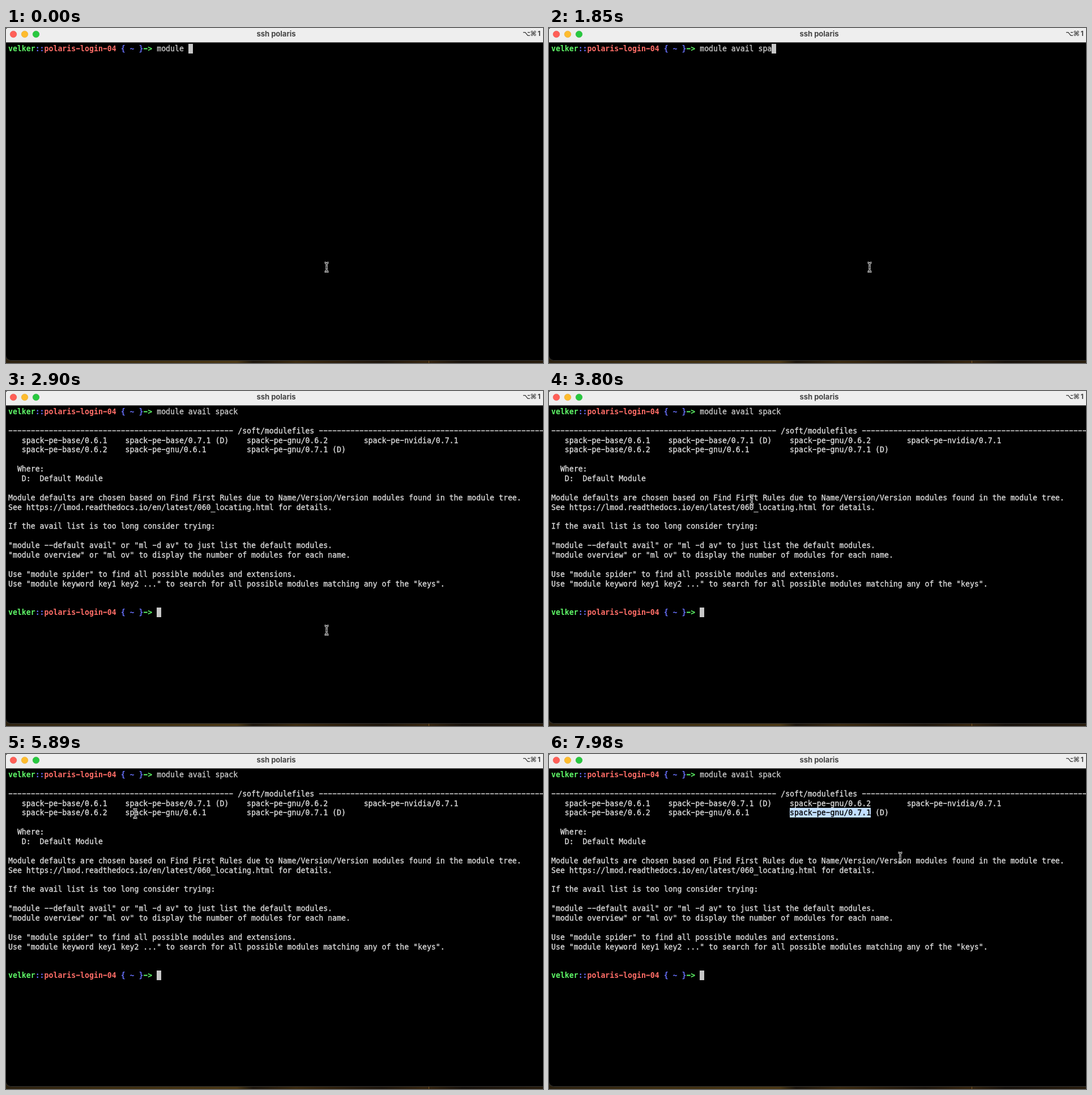
An HTML page with a canvas that plays this animation: 948x591 px, repeating every 8000 ms.

```html
<!DOCTYPE html>
<html lang="en">
<head>
<meta charset="utf-8">
<title>Terminal</title>
<style>
html, body { margin: 0; width: 100%; height: 100%; overflow: hidden; background: #000; }
canvas { display: block; }
</style>
</head>
<body>
<canvas id="stage" width="948" height="591"></canvas>
<script>
const ctx = document.getElementById('stage').getContext('2d');
const LOOP = 8000, LEFT = 4, CELL = 7.945, TOP = 28, ROW = 16.87;
const GREY = '#c7c7c7', BRIGHT = '#dadada', GREEN = '#5ffa68', RED = '#ff6d67', BLUE = '#6871ff';
const MONO = '13.2px "DejaVu Sans Mono", monospace';

const PROMPT = [['velker', GREEN], ['::', BLUE], ['polaris-login-04', RED], [' { ~ }', BLUE], ['->', GREEN]];
const PROMPT_COLS = 33;
const COMMAND = 'module avail spack';
// [time, number of command characters shown]
const TYPING = [[0, 7], [500, 8], [950, 10], [1100, 11], [1250, 12], [1400, 13],
  [1700, 14], [1850, 16], [2000, 17], [2150, 18]];
const ENTER = 2600, OUTPUT = 2900, SELECT = 7680;

const LINES = `
${'-'.repeat(50)} /soft/modulefiles ${'-'.repeat(51)}
   spack-pe-base/0.6.1    spack-pe-base/0.7.1 (D)    spack-pe-gnu/0.6.2        spack-pe-nvidia/0.7.1
   spack-pe-base/0.6.2    spack-pe-gnu/0.6.1         spack-pe-gnu/0.7.1 (D)

  Where:
   D:  Default Module

Module defaults are chosen based on Find First Rules due to Name/Version/Version modules found in the module tree.
See https://lmod.readthedocs.io/en/latest/060_locating.html for details.

If the avail list is too long consider trying:

"module --default avail" or "ml -d av" to just list the default modules.
"module overview" or "ml ov" to display the number of modules for each name.

Use "module spider" to find all possible modules and extensions.
Use "module keyword key1 key2 ..." to search for all possible modules matching any of the "keys".`.split('\n');

// Pointer moves: [start, steps, x, y], one step every 150 ms, easing out
const MOVES = [[3500, 1, 530, 448], [3650, 2, 358, 192], [4100, 7, 301, 106],
  [5150, 5, 236, 103], [5890, 3, 222, 106], [6340, 4, 312, 107],
  [7090, 2, 500, 109], [7980, 1, 620, 182]];

const cellX = col => LEFT + col * CELL;
const cellY = row => Math.round(TOP + row * ROW);

function box(col, row, cols, color) {
  ctx.fillStyle = color;
  ctx.fillRect(Math.round(cellX(col)), cellY(row), Math.round(cols * CELL), 17);
}

// Text on the terminal grid, with the wide hyphens of the terminal font;
// a hairline stroke gives regular text its smoothed weight
function print(text, col, row, color = GREY, bold = false) {
  ctx.font = (bold ? 'bold ' : '') + MONO;
  ctx.textAlign = 'left';
  ctx.fillStyle = ctx.strokeStyle = color;
  ctx.lineWidth = .35;
  ctx.lineJoin = 'round';
  const y = cellY(row) + 13;
  [...text].forEach((ch, i) => {
    const x = cellX(col + i);
    if (ch === '-') ctx.fillRect(x + .7, y - 5.5, 6.6, bold ? 2 : 1.5);
    else if (ch !== ' ') {
      ctx.fillText(ch, x, y);
      if (!bold) ctx.strokeText(ch, x, y);
    }
  });
}

function prompt(row) {
  let col = 0;
  for (const [text, color] of PROMPT) {
    print(text, col, row, color, true);
    col += text.length;
  }
}

function titleBar() {
  ctx.fillStyle = '#eee';
  ctx.beginPath();
  ctx.roundRect(0, 0, 960, 25, [3, 0, 0, 0]);
  ctx.fill();
  ctx.fillStyle = '#555';
  ctx.fillRect(0, 25, 948, 1);
  [['#ff5f57', '#e0443e'], ['#febc2e', '#dea123'], ['#28c840', '#1aab29']].forEach(([fill, edge], i) => {
    ctx.beginPath();
    ctx.arc(13 + 20 * i, 11, 5.8, 0, 7);
    ctx.fillStyle = fill;
    ctx.fill();
    ctx.strokeStyle = edge;
    ctx.lineWidth = .5;
    ctx.stroke();
  });
  ctx.fillStyle = '#454545';
  ctx.textAlign = 'center';
  ctx.font = 'bold 13px Inter, sans-serif';
  ctx.fillText('ssh polaris', 477, 15);
  ctx.font = 'bold 12px "DejaVu Sans", sans-serif';
  ctx.fillText('⌥', 919, 14);
  ctx.fillText('⌘', 931, 14);
  ctx.font = 'bold 12px Inter, sans-serif';
  ctx.fillText('1', 941, 14);
}

// Sliver of desktop below the window's rounded corner
function desktop() {
  const g = ctx.createLinearGradient(0, 0, 948, 0);
  [[0, '#2c2110'], [.2, '#3d2d10'], [.43, '#4a3714'], [.46, '#1c150c'], [.54, '#3a290f'],
    [.62, '#2c1e0c'], [.7, '#1d150c'], [.78, '#35240e'], [.85, '#17110b'], [1, '#281c0d']]
    .forEach(stop => g.addColorStop(...stop));
  ctx.fillStyle = g;
  ctx.fillRect(0, 575, 948, 16);
  ctx.fillStyle = '#7a5523';
  ctx.fillRect(746, 587, 1, 4);
  ctx.fillStyle = '#000';
  ctx.strokeStyle = '#333';
  ctx.lineWidth = 1;
  ctx.beginPath();
  ctx.roundRect(-.5, 26, 960, 560.5, [0, 0, 0, 9]);
  ctx.fill();
  ctx.stroke();
}

function pointerAt(t) {
  let x = 566, y = 422;
  for (const [start, steps, toX, toY] of MOVES) {
    if (t < start) break;
    const k = Math.min(1, (Math.floor((t - start) / 150) + 1) / steps);
    const e = 1 - (1 - k) ** 2;
    x += (toX - x) * e;
    y += (toY - y) * e;
  }
  return [Math.round(x), Math.round(y)];
}

function pointer(x, y) {
  const beam = new Path2D('M-3.5-8Q0-8 0-5.5Q0-8 3.5-8M0-5.5V5.5M-3.5 8Q0 8 0 5.5Q0 8 3.5 8M-2 0H2');
  ctx.save();
  ctx.translate(x, y);
  ctx.lineJoin = 'round';
  [['#fff', 3], ['#000', 1.1]].forEach(([color, width]) => {
    ctx.strokeStyle = color;
    ctx.lineWidth = width;
    ctx.stroke(beam);
  });
  ctx.restore();
}

function draw(t) {
  ctx.fillStyle = '#000';
  ctx.fillRect(0, 0, 948, 591);
  desktop();
  titleBar();
  prompt(0);
  const typed = TYPING.filter(([time]) => time <= t).pop()[1];
  print(COMMAND.slice(0, typed), PROMPT_COLS, 0);

  if (t < ENTER) box(PROMPT_COLS + typed, 0, 1, GREY);
  else if (t < OUTPUT) box(0, 1, 1, GREY);
  else {
    LINES.forEach((line, i) => print(line, 0, i + 1, BRIGHT));
    prompt(21);
    box(PROMPT_COLS, 21, 1, GREY);
  }
  if (t >= SELECT) {
    box(53, 4, 18, '#c1deff');
    print('spack-pe-gnu/0.7.1', 53, 4, '#000');
  }
  pointer(...pointerAt(t));
}

function tick() {
  draw(performance.now() % LOOP);
  requestAnimationFrame(tick);
}
tick();
</script>
</body>
</html>
```
